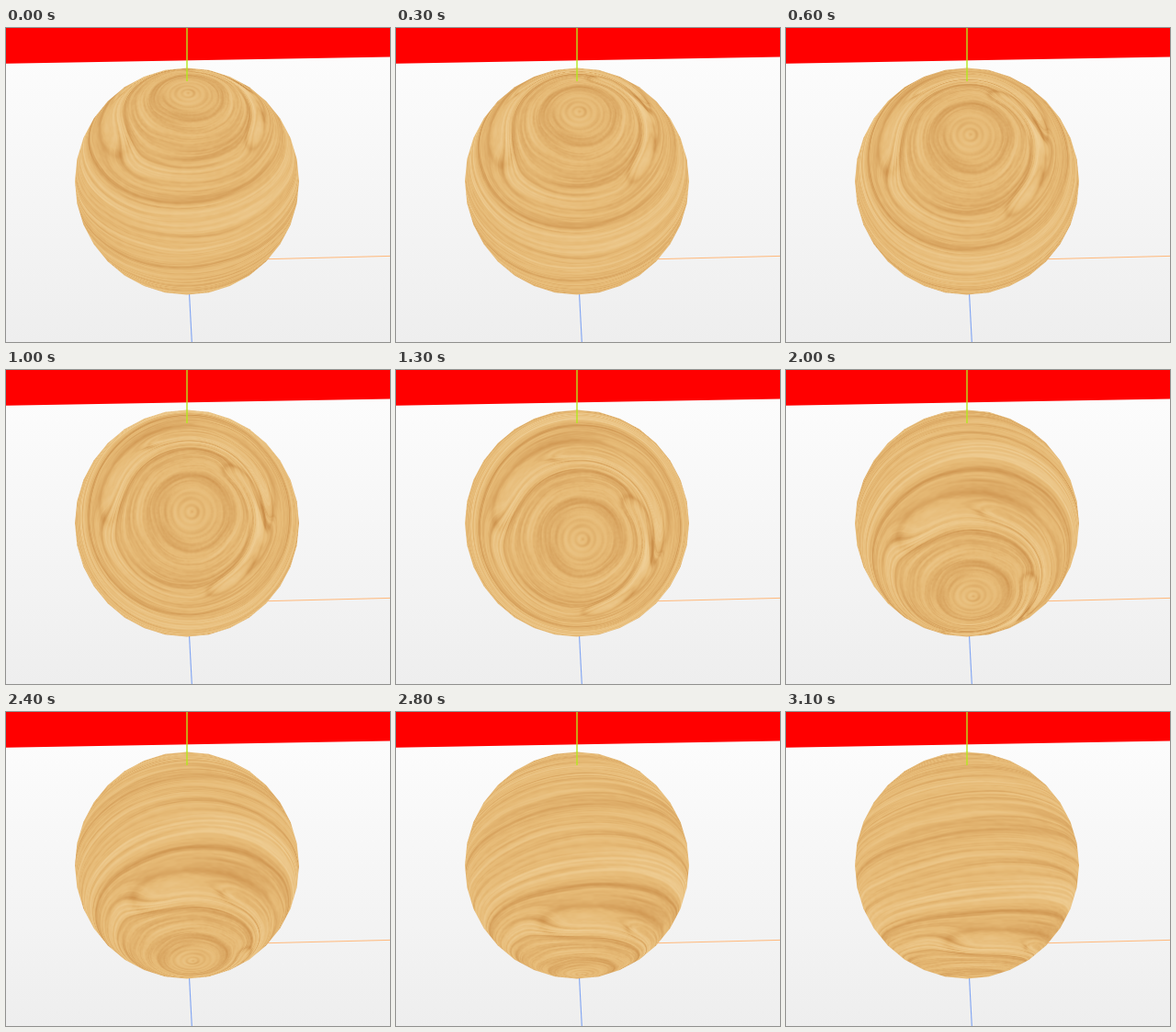
Write an HTML page with a canvas that moves like this. It is 418 px wide and 342 px high and loops after 3200 ms.

```html
<!DOCTYPE html>
<html lang="en">
<head>
<meta charset="utf-8">
<title>Turning wooden ball</title>
<style>
  html, body { margin: 0; width: 100%; height: 100%; overflow: hidden; background: #f6f6f6; }
  canvas { display: block; width: 418px; height: 342px; }
</style>
</head>
<body>
<canvas id="stage" width="418" height="342"></canvas>
<script>
const ctx = document.getElementById('stage').getContext('2d');
const STEP = 100, STEPS = 32;
const CX = 197, CY = 167, RX = 122, RY = 123.5;
const DEG = Math.PI / 180;

// Seeded value noise, periodic along x
let seed = 20;
const lattice = Float32Array.from({ length: 8192 }, () => {
  seed = (seed * 1664525 + 1013904223) >>> 0;
  return seed / 2147483648 - 1;
});
const ease = t => t * t * (3 - 2 * t);
const ramp = (from, to, x) => ease(Math.max(0, Math.min(1, (x - from) / (to - from))));
const bell = x => Math.exp(-x * x);
const wrap = a => ((a % 360) + 360) % 360;
function noise(x, y, period) {
  const xi = Math.floor(x), yi = Math.floor(y);
  const u = ease(x - xi), v = ease(y - yi);
  const at = (i, j) => lattice[((i % period) * 71 + j * 157 + period * 13) & 8191];
  const top = at(xi, yi) + (at(xi + 1, yi) - at(xi, yi)) * u;
  const low = at(xi, yi + 1) + (at(xi + 1, yi + 1) - at(xi, yi + 1)) * u;
  return top + (low - top) * v;
}

// Main dark and light belts, h in degrees from the pole
const belts = h =>
  .3 * Math.cos(h * 2.4) * Math.exp(-h / 9)
  + .5 * bell((h - 14) / 3)
  + .5 * bell((h - 50) / 3)
  - .35 * bell((h - 59.5) / 5)
  + .5 * bell((h - 69.5) / .9)
  + .25 * bell((h - 88) / 4);

// Tapered ridge running around the pole, with a tip at each end
function ridge(lon, lat, start, length, from, to, width) {
  const s = wrap(lon - start) / length;
  if (s >= 1) return 0;
  return ramp(0, .2, Math.min(s, 1 - s)) * bell((lat - from - (to - from) * s) / width);
}
// A ridge has a light body inside a dark outline
const fingerTone = r => .45 * bell((r - .32) / .13) - .4 * ramp(.4, .9, r);

function woodTone(lon, lat) {
  const u = lon / 360;
  const outer = noise(u * 7, lat / 11, 7) + .4 * noise(u * 19, lat / 5, 19);
  const long = ridge(lon, lat, 160, 217, 37, 35, 7);
  const inner = ridge(lon, lat, 228, 155, 36, 35, 3);
  const hook = ridge(lon, lat, 296, 155, 23, 36, 4);
  const h = Math.max(0, lat + ramp(4, 30, lat) * outer
    + 4.5 * Math.sin(lon * DEG) * ramp(35, 60, lat)
    + 10 * long + 5 * inner + 6 * hook);
  const grain = ramp(0, 20, lat);
  return belts(h) + fingerTone(long) + fingerTone(inner) + fingerTone(hook)
    + (.2 + .2 * grain) * noise(u * 4, h * .45, 4)
    + (.1 + .25 * grain) * noise(u * 6, h * 1.05 + 90, 6)
    + .2 * grain * noise(u * 12, h * 2 + 30, 12)
    + .1 * grain * noise(u * 110, lat * 1.5, 110);
}

const COLS = 768, ROWS = 600, PER_DEG = 4;
const wood = new Float32Array(COLS * ROWS);
for (let row = 0, i = 0; row < ROWS; row++)
  for (let col = 0; col < COLS; col++) wood[i++] = woodTone(col * 360 / COLS, row / PER_DEG);

function sampleWood(lon, lat) {
  const x = wrap(lon) * COLS / 360, y = Math.min(ROWS - 2, lat * PER_DEG);
  const xi = Math.floor(x) % COLS, yi = Math.floor(y), xn = (xi + 1) % COLS;
  const u = x - Math.floor(x), v = y - yi, a = yi * COLS, b = a + COLS;
  return (wood[a + xi] * (1 - u) + wood[a + xn] * u) * (1 - v)
    + (wood[b + xi] * (1 - u) + wood[b + xn] * u) * v;
}

// Surface point behind each pixel; the camera stands four radii from the centre
const W = 248, H = 252, DIST = 4, SPAN = DIST * DIST - 1;
const ball = document.createElement('canvas');
ball.width = W;
ball.height = H;
const ballCtx = ball.getContext('2d');
const image = ballCtx.createImageData(W, H);
const points = new Float32Array(W * H * 3);
for (let i = 0; i < W * H; i++) {
  let x = (i % W + .5 - W / 2) / RX, y = (Math.floor(i / W) + .5 - H / 2) / RY;
  const scale = Math.sqrt(SPAN) * Math.max(1, Math.hypot(x, y));
  x /= scale;
  y /= scale;
  const q = x * x + y * y + 1;
  const t = (DIST - Math.sqrt(Math.max(0, DIST * DIST - q * SPAN))) / q;
  points.set([x * t, y * t, DIST - t], i * 3);
}

const BASE = [230, 186, 118], DARK = [205, 147, 78], LIGHT = [240, 208, 152];
function paintBall(step) {
  const tilt = (-40.5 + 3.6 * step) * DEG, spin = 3.6 * (step - 10);
  const sin = Math.sin(tilt), cos = Math.cos(tilt), data = image.data;
  for (let i = 0; i < W * H; i++) {
    const px = points[i * 3], py = points[i * 3 + 1], pz = points[i * 3 + 2];
    // The tilting axis is slightly askew to the view
    const x = px - .028 * py - .033 * pz, y = py + .028 * px, z = pz + .033 * px;
    const ty = y * cos - z * sin, tz = y * sin + z * cos;
    const lat = Math.atan2(Math.hypot(x, ty), tz) / DEG;
    const tone = sampleWood(Math.atan2(ty, x) / DEG - spin, lat);
    const goal = tone > 0 ? DARK : LIGHT;
    const mix = Math.min(1.1, Math.abs(tone) * .9);
    for (let c = 0; c < 3; c++) data[i * 4 + c] = BASE[c] + (goal[c] - BASE[c]) * mix;
    data[i * 4 + 3] = 255;
  }
  ballCtx.putImageData(image, 0, 0);
}

function line(color, width, x1, y1, x2, y2) {
  ctx.strokeStyle = color;
  ctx.lineWidth = width;
  ctx.beginPath();
  ctx.moveTo(x1, y1);
  ctx.lineTo(x2, y2);
  ctx.stroke();
}

function paintScene(step) {
  const ground = ctx.createLinearGradient(0, 35, 0, 342);
  ground.addColorStop(0, '#fcfcfc');
  ground.addColorStop(1, '#eeeeee');
  ctx.fillStyle = ground;
  ctx.fillRect(0, 0, 418, 342);
  ctx.fillStyle = '#f00';
  ctx.beginPath();
  ctx.moveTo(0, 0);
  ctx.lineTo(418, 0);
  ctx.lineTo(418, 31.5);
  ctx.lineTo(0, 38.7);
  ctx.fill();

  line('#ffb87a', 1, 280, 251.8, 418, 248.4);
  line('#80a4f2', 1.1, 199.3, 285, 202.3, 342);

  paintBall(step);
  ctx.save();
  ctx.beginPath();
  for (let i = 0; i < 32; i++) {
    const a = i * 360 / 32 * DEG;
    ctx.lineTo(CX + RX * Math.cos(a), CY + RY * Math.sin(a));
  }
  ctx.clip();
  ctx.drawImage(ball, CX - W / 2, CY - H / 2);
  ctx.restore();

  line('#b4e81e', 1.4, 197, 0, 197, 58);
}

const started = performance.now();
let shown = -1;
function tick() {
  const step = Math.floor((performance.now() - started) / STEP) % STEPS;
  if (step !== shown) paintScene(shown = step);
  requestAnimationFrame(tick);
}
tick();
</script>
</body>
</html>
```
